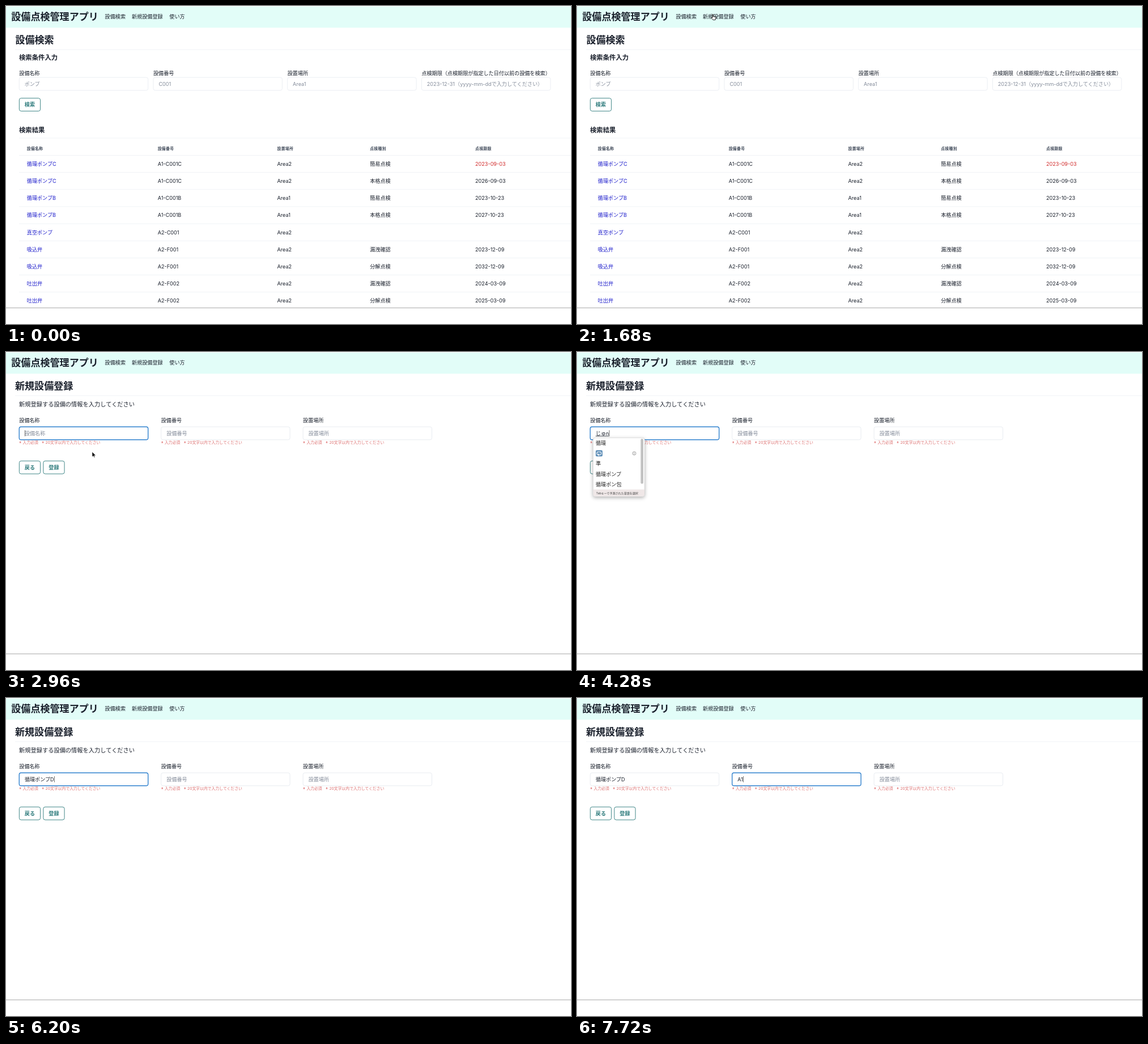
Recreate the animation shown at these times as an HTML page. Size 997 by 561 pixels, loop 8 s.

```html
<!DOCTYPE html>
<html lang="ja">
<head>
<meta charset="utf-8">
<style>
html, body { margin: 0; width: 100%; height: 100%; overflow: hidden; background: #fff; }
svg { display: block; width: 997px; height: 561px; font-family: Inter, "Noto Sans CJK JP", "Noto Sans CJK", sans-serif; white-space: pre; }
#popup { filter: drop-shadow(0 2px 3px rgba(0, 0, 0, .3)); }
</style>
</head>
<body>
<svg id="stage" viewBox="0 0 997 561">
  <g id="frame"></g><g id="search"></g><g id="form"></g><g id="fields"></g>
  <g id="popup"></g>
  <path id="arrow" d="M0 0V9.2L2.2 7.3L3.6 10.3L5 9.7L3.7 6.8H6.5Z" stroke="#fff" stroke-width=".7"/>
  <path id="hand" d="M2.6 1C2.6 0 4 0 4 1V4L7.8 4.8Q8.8 5.1 8.5 6.4L7.6 10H3.4L.7 6.6C.2 5.7 1.2 5 2 5.7L2.6 6.3Z" fill="#fff" stroke="#111" stroke-width=".9"/>
</svg>
<script>
const LOOP = 8000, SIZE = 9.1;
const INK = '#1a202c', TEAL = '#2c7a7b', HINT = '#858d9b', RULE = '#edf0f4', BLUE = '#3182ce';
const el = id => document.getElementById(id);
const pen = document.createElement('canvas').getContext('2d');
pen.font = '91px Inter, "Noto Sans CJK JP", "Noto Sans CJK", sans-serif';
const widthOf = s => pen.measureText(s).width / 10;

// Text is placed by its left edge and vertical centre.
const text = (x, y, s, size = SIZE, fill = INK, extra = '') =>
  `<text x="${x}" y="${y + size * .37}" font-size="${size}" fill="${fill}" ${extra}>${s}</text>`;
const bold = (x, y, s, size, fill) => text(x, y, s, size, fill, 'font-weight="600"');
const rect = (x, y, w, h, fill, extra = '') =>
  `<rect x="${x}" y="${y}" width="${w}" height="${h}" fill="${fill}" ${extra}/>`;
const box = (x, y, w, stroke, line = .8) =>
  rect(x, y, w, 22.8, '#fff', `rx="3.3" stroke="${stroke}" stroke-width="${line}"`);
const rule = (x, y) => rect(x, y, 997 - x, .8, RULE);
const button = (x, y, s) => box(x, y, 37.2, TEAL, .9) + bold(x + 9.4, y + 11.1, s, SIZE, TEAL);

el('frame').innerHTML = rect(0, 1, 997, 37.3, '#e2fdf8') +
  bold(9.3, 19, '設備点検管理アプリ', 17.07) +
  text(174.6, 19, '設備検索') + text(222, 19, '新規設備登録') + text(288.3, 19, '使い方') +
  rule(16, 76.6) + rect(0, 532, 997, 1.1, '#b0b0b0');

const filters = [['設備名称', 'ポンプ'], ['設備番号', 'C001'], ['設置場所', 'Area1'],
  ['点検期限（点検期限が指定した日付以前の設備を検索）', '2023-12-31（yyyy-mm-ddで入力してください）']];
const columns = [36.8, 267.7, 478.5, 642.2, 828];
const heads = ['設備名称', '設備番号', '設置場所', '点検種別', '点検期限'];
const rows = `循環ポンプC A1-C001C Area2 簡易点検 2023-09-03
循環ポンプC A1-C001C Area2 本格点検 2026-09-03
循環ポンプB A1-C001B Area1 簡易点検 2023-10-23
循環ポンプB A1-C001B Area1 本格点検 2027-10-23
真空ポンプ A2-C001 Area2
吸込弁 A2-F001 Area2 漏洩確認 2023-12-09
吸込弁 A2-F001 Area2 分解点検 2032-12-09
吐出弁 A2-F002 Area2 漏洩確認 2024-03-09
吐出弁 A2-F002 Area2 分解点検 2025-03-09`.split('\n').map(r => r.split(' '));
const cellColor = (r, c) => c === 0 ? '#1c1ccb' : r === 0 && c === 4 ? '#d12b2b' : INK;

el('search').innerHTML = bold(16.4, 60, '設備検索', 17.07) +
  bold(23, 91, '検索条件入力', 11.38) +
  filters.map(([label, hint], i) => {
    const x = 23.3 + 236.7 * i;
    return text(x, 119, label) + box(x, 126, 227.4, '#e6eaf0') + text(x + 9.4, 137.5, hint, SIZE, HINT);
  }).join('') +
  button(23.4, 162.6, '検索') + bold(23, 219, '検索結果', 11.38) + rule(23, 232.6) +
  heads.map((h, i) => text(columns[i], 251.5, h, 6.83, '#3a4454', 'font-weight="600" letter-spacing=".34"')).join('') +
  rows.map((row, r) => rule(23, 263 + 30.17 * r) +
    row.map((s, c) => text(columns[c], 278.6 + 30.15 * r, s, SIZE, cellColor(r, c))).join('')).join('');

const fieldX = i => 23.3 + 250.4 * i;
const labels = heads.slice(0, 3);
const note = (x, s) => text(x, 159.5, '※', 5.2, '#d95757', 'font-weight="600"') + text(x + 6.3, 159.5, s, 6.83, '#dc7070');

el('form').innerHTML = bold(16, 60, '新規設備登録', 17.07) +
  text(23, 92, '新規登録する設備の情報を入力してください', 10.24) +
  labels.map((s, i) => text(fieldX(i), 120.4, s) +
    note(fieldX(i), '入力必須') + note(fieldX(i) + 40, '20文字以内で入力してください')).join('') +
  button(23.4, 192.2, '戻る') + button(65.9, 192.2, '登録');

const PAGE = 2060, FOCUS = 2480, TAB = 6760;
const nameKeys = [[0, ''], [3920, 'j'], [4000, 'じ'], [4120, 'じゅ'], [4240, 'じゅn'], [4320, 'じゅん'],
  [4400, 'じゅんk'], [4480, 'じゅんか'], [4560, 'じゅんかn'], [4640, 'じゅんかん'], [4880, 'じゅんかんp'],
  [4960, 'じゅんかんぽ'], [5040, 'じゅんかんぽn'], [5120, 'じゅんかんぽん'], [5200, 'じゅんかんぽんp'],
  [5280, 'じゅんかんぽんぷ'], [5400, '循環ポンプ'], [5720, '循環ポンプD']];
const codeKeys = [[0, ''], [7400, 'A'], [7720, 'A1']];
const lists = [[0, []], [4000, ['時', '字', '自', '事', '次']], [4120, ['順', '中', '重', '準', '十']],
  [4240, ['循環', '↩', '準', '循環ポンプ', '循環ポン包']],
  [4720, ['循環', '↩', '循環ポンプ', '循環ポン包', '循環器']],
  [4880, ['循環ポンプ', '循環ポン包', '循環']], [4960, ['循環ポンプ', '循環ポン包', '循環歩']],
  [5120, ['循環ポンプ', '循環ポン包']], [5400, []]];
const at = (keys, t) => keys.findLast(k => k[0] <= t)[1];

function field(i, value, focus, composing) {
  const x = fieldX(i), left = x + 9.6, end = left + widthOf(value);
  // While the last letter alone is unconfirmed, only it is underlined.
  const from = value.endsWith('D') ? left + widthOf('循環ポンプ') : left;
  return box(x, 132, 227.4, focus ? BLUE : '#e3e8ee', focus ? 1.4 : .8) +
    text(left, 143.2, value || labels[i], SIZE, value ? INK : HINT) +
    (composing ? rect(from, 147.8, end - from, .8, INK) : '') +
    (focus ? rect(end + .2, 138, .7, 10.6, '#333') : '');
}

const loopIcon = y => rect(33, y - 5.5, 12, 11, '#5f8fb8', 'rx="2"') +
  `<path d="M41 ${y + 2.5}H37Q35.2 ${y + 2.5} 35.2 ${y}T37 ${y - 2.5}H41Q42.8 ${y - 2.5} 42.8 ${y}T41 ${y + 2.5}M39 ${y + .6}L37 ${y + 2.5}L39 ${y + 4.3}" fill="none" stroke="#fff" stroke-width="1.1"/>` +
  `<circle cx="101" cy="${y}" r="3" fill="none" stroke="#777" stroke-width=".7"/>` +
  rect(100.6, y - 1.7, .8, .8, '#777') + rect(100.6, y - .5, .8, 2.2, '#777');

function popup(items) {
  if (!items.length) return '';
  return rect(28.3, 151.3, 91, 103.6, '#fff', 'rx="4" stroke="#c9c9c9" stroke-width=".6"') +
    '<path d="M28.6 242.6H119V251Q119 254.6 115.4 254.6H32.2Q28.6 254.6 28.6 251Z" fill="#efe7e7"/>' +
    text(33.8, 248.7, 'Tabキーで予測された単語を選択', 5.05, '#444') +
    items.map((s, i) => {
      const y = 160.6 + 18.2 * i;
      return s === '↩' ? loopIcon(y) : text(33, y, s, SIZE, '#222');
    }).join('') +
    (items.length > 4 ? rect(112.4, 153, 4.6, 79.5, '#c2c2c2', 'rx="2.3"') : '');
}

const path = [[520, -8, 512], [1320, 76, 130], [1640, 236.5, 14.5], [2100, 236.5, 14.5],
  [2420, 150, 141], [2560, 150, 141], [2840, 152, 176], [3920, 152, 176]];
function pointer(t) {
  const n = path.findIndex(p => p[0] > t);
  if (n < 1) return null;
  const [a, b] = [path[n - 1], path[n]];
  let k = (t - a[0]) / (b[0] - a[0]);
  k = n === 1 ? k * k : n === 2 ? k * (2 - k) : k * k * (3 - 2 * k);
  return [a[1] + (b[1] - a[1]) * k, a[2] + (b[2] - a[2]) * k];
}

const show = (id, on) => { el(id).style.display = on ? '' : 'none'; };

function render(t) {
  const onForm = t >= PAGE, p = pointer(t);
  const overLink = !!p && p[0] > 222 && p[1] < 25;
  show('search', !onForm);
  show('form', onForm);
  show('fields', onForm);
  const composing = t >= 3920 && t < 5480 || t >= 5720 && t < 5880;
  el('fields').innerHTML = field(0, at(nameKeys, t), t >= FOCUS && t < TAB, composing) +
    field(1, at(codeKeys, t), t >= TAB) + field(2, '');
  el('popup').innerHTML = popup(at(lists, t));
  show('arrow', p && !overLink);
  show('hand', overLink);
  if (p) ['arrow', 'hand'].forEach(id => el(id).setAttribute('transform', `translate(${p})`));
}

const start = performance.now();
function tick() {
  render((performance.now() - start) % LOOP);
  requestAnimationFrame(tick);
}
tick();
</script>
</body>
</html>
```
